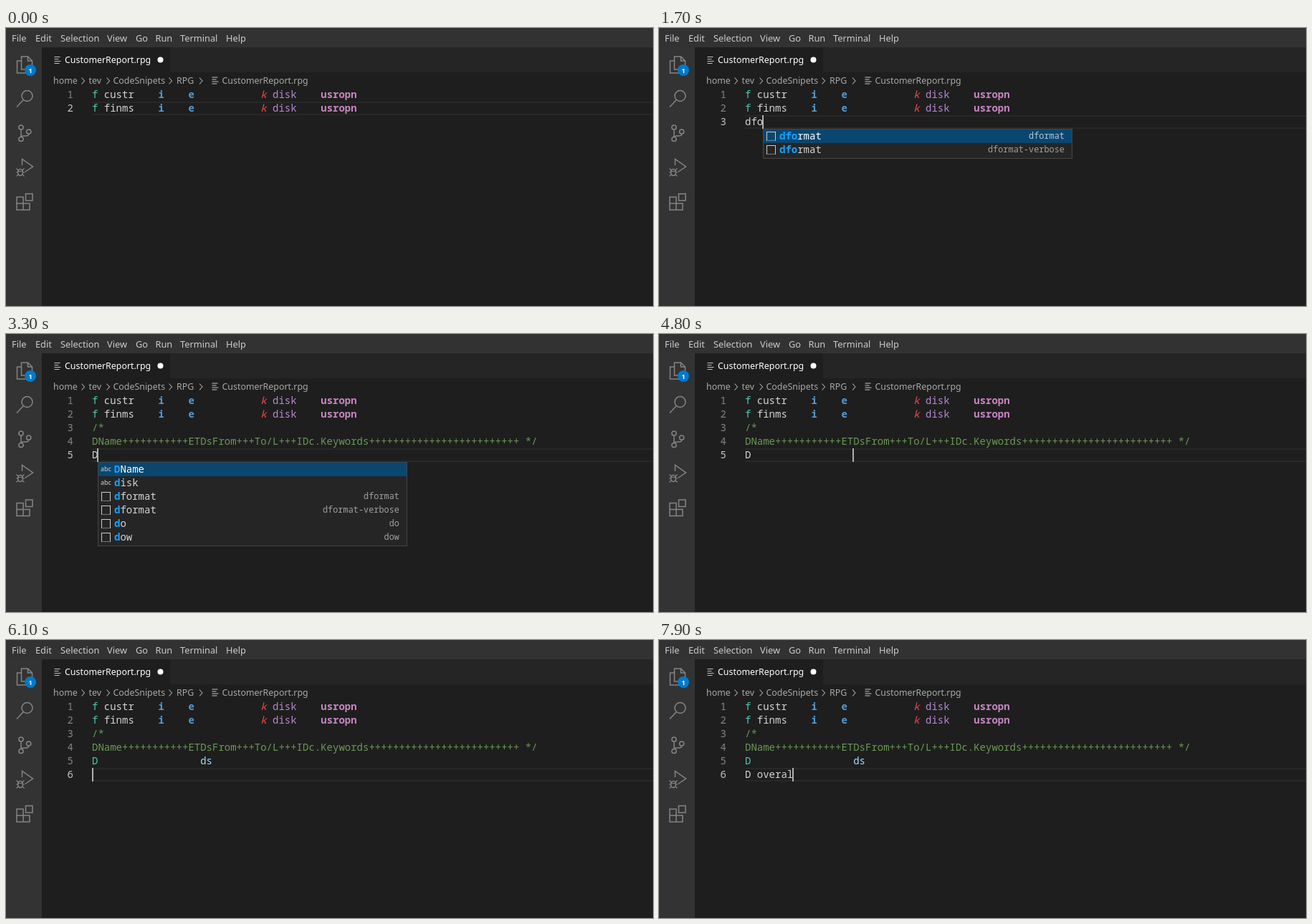
These frames come from a looping animation (903x389 px, 8000 ms). An HTML page:

```html
<!DOCTYPE html>
<html lang="en">
<head>
<meta charset="utf-8">
<title>Code editor</title>
<style>
html, body { margin: 0; width: 100%; height: 100%; overflow: hidden; background: #1e1e1e; }
#stage { position: relative; width: 903px; height: 389px; overflow: hidden; background: #1e1e1e;
  font: 12.4px/18px "Noto Sans", "Open Sans", sans-serif; color: #ccc; }
#stage div, #stage svg, .ui span { position: absolute; white-space: pre; }
.title { left: 0; top: 0; width: 903px; height: 27px; background: #323233; font-size: 12.8px; }
.title span { top: 5px; }
.side { left: 0; top: 27px; width: 50px; height: 362px; background: #333; }
.tabs { left: 50px; top: 27px; width: 853px; height: 35px; background: #252526; }
.tab { left: 0; top: 0; width: 179px; height: 35px; background: #1e1e1e; color: #fff; }
.tab span { left: 32px; top: 9px; }
.crumbs { left: 0; top: 62px; color: #a9a9a9; }
.crumbs span { top: 3px; }
#icons { left: 0; top: 0; fill: none; stroke: #858585; stroke-width: 1.5; }

#editor { left: 0; top: 84px; width: 903px; height: 305px; }
#editor, #popup { font: 14px/19px "Noto Sans Mono", "DejaVu Sans Mono", monospace; color: #d4d4d4; }
.line, .num, .label, .detail, .abc { margin-top: -1px; }
.line { left: 120px; height: 19px; }
.num { left: 60px; width: 34px; text-align: right; color: #858585; }
.num.now { color: #c6c6c6; }
#here { left: 120px; width: 783px; height: 19px; box-sizing: border-box;
  border: solid #282828; border-width: 2px 0; }
#caret { width: 2px; height: 19px; background: #aeafad; }
.spec { color: #4ec9b0; }
.flag { color: #569cd6; font-weight: 700; }
.key { color: #f44747; font-style: italic; }
.dev { color: #b888d0; }
.word { color: #c586c0; font-weight: 700; }
.note { color: #6a9955; }
.var { color: #9cdcfe; }

#popup { width: 432px; box-sizing: border-box; background: #252526; border: 1px solid #454545; }
.row { left: 0; width: 430px; height: 19px; }
.row.on { background: #094771; color: #fff; }
.row b { color: #18a3ff; }
.label { left: 22px; }
.detail { right: 10px; font-size: 11.9px; opacity: .7; }
.abc { left: 3px; font: 9px/19px "Noto Sans", sans-serif; color: #d4d4d4; }
.snip { left: 4px; top: 3px; width: 11px; height: 11px; border: 1px solid #ccc; border-bottom-style: dotted; }
</style>
</head>
<body>
<div id="stage">
  <div class="ui title">
    <span style="left:8px">File</span><span style="left:41px">Edit</span>
    <span style="left:76px">Selection</span><span style="left:141px">View</span>
    <span style="left:181px">Go</span><span style="left:208.5px">Run</span>
    <span style="left:243px">Terminal</span><span style="left:307px">Help</span>
  </div>
  <div class="side"></div>
  <div class="tabs"><div class="ui tab"><span>CustomerReport.rpg</span></div></div>
  <div class="ui crumbs">
    <span style="left:66px">home</span><span style="left:115.5px">tev</span>
    <span style="left:149.5px">CodeSnipets</span><span style="left:238px">RPG</span>
    <span style="left:301.5px">CustomerReport.rpg</span>
  </div>
  <svg id="icons" width="903" height="389">
    <!-- files -->
    <path d="M21.5 40h9l6 6v12h-15zM30.5 40v6h6M21.5 46h-6v17h14v-5"/>
    <circle cx="34" cy="59" r="8" fill="#007acc" stroke="none"/>
    <text x="34" y="62.5" text-anchor="middle" font-size="9" font-weight="600" fill="#fff" stroke="none">1</text>
    <!-- search -->
    <circle cx="29.5" cy="95" r="7.5"/>
    <path d="M24.3 100.5L15 110.5"/>
    <!-- branches -->
    <circle cx="21" cy="139" r="3.1"/><circle cx="21" cy="155.5" r="3.1"/><circle cx="31.7" cy="145" r="3.1"/>
    <path d="M21 142v10.5M31.7 148q0 3-4 3h-3q-3.7 0-3.7 2"/>
    <!-- run and debug -->
    <path d="M22.5 192v-8.5l15 10.5-11 7.5"/>
    <ellipse cx="20" cy="202" rx="3.4" ry="4.6"/>
    <path d="M16.6 200.5h6.8M14 202h2.6M23.4 202h2.6M14.5 196.5l2.6 2.5M25.5 196.5l-2.6 2.5M14.5 207.5l2.6-2.5M25.5 207.5l-2.6-2.5" stroke-width="1.2"/>
    <!-- extensions -->
    <path d="M15 236.5h9v9h9v9h-18zM15 245.5h9v9M27.5 232h9.5v9.5h-9.5z"/>
    <!-- file marks and path arrows -->
    <g stroke="#c5c5c5" stroke-width="1.1">
      <path id="mark" d="M67.5 40.5h8M67.5 43.5h6M67.5 46.5h9M67.5 49.5h7"/>
      <use href="#mark" x="220" y="28.5"/>
    </g>
    <g stroke="#a9a9a9" stroke-width="1.1">
      <path id="arrow" d="M105.5 69.5l4 4.5-4 4.5"/>
      <use href="#arrow" x="35"/><use href="#arrow" x="122"/><use href="#arrow" x="164.5"/>
    </g>
    <circle cx="215.5" cy="44.5" r="4" fill="#fff" stroke="none"/>
  </svg>
  <div id="editor"></div>
  <div id="popup"></div>
</div>
<script>
const LOOP = 8000, CHAR = 8.4, ROW = 19, LEFT = 120, TOP = 84;
const $ = id => document.getElementById(id);
const plus = n => '+'.repeat(n);

const files = ['custr', 'finms'].map(f =>
  `f ${f}    i    e           k disk    usropn`).join('\n');
const header = `${files}\n/*\nDName${plus(11)}ETDsFrom${plus(3)}To/L${plus(3)}IDc.Keywords${plus(25)} */`;
const pad = n => `${header}\nD${' '.repeat(n - 1)}`;
const struct = pad(18) + 'ds\n';

const formats = ['dformat|dformat', 'dformat|dformat-verbose'];
const snippets = [...formats, 'do|do', 'dow|dow'];
const list = (find, on, items) => ({ find, on, items });
const pick = find => list(find, 0, formats);

// time, text, caret shown, suggestions
const steps = [
  [0, files, 0],
  [200, files, 1],
  [700, files, 0],
  [800, files + '\n', 1],
  [1300, files + '\nd', 1, list('d', 1, ['disk', ...snippets])],
  [1600, files + '\ndf', 1, pick('df')],
  [1700, files + '\ndfo', 1, pick('dfo')],
  [1800, files + '\ndfor', 1, pick('dfor')],
  [2100, header, 1],
  [2600, header, 0],
  [2700, header + '\n', 1],
  [3200, header + '\n', 0],
  [3300, header + '\nD', 1, list('d', 0, ['DName', 'disk', ...snippets])],
  [3600, pad(2), 1],
  ...[3, 6, 10, 13, 17].map((n, i) => [4100 + i * 100, pad(n), 1]),
  [4800, pad(18), 1],
  [5100, pad(18) + 'd', 1, list('d', 1, ['disk', ...snippets, 'D', 'DName'])],
  [5300, pad(18) + 'ds', 1, list('ds', 0, ['disk'])],
  [5800, pad(18) + 'ds', 0],
  [6100, struct, 1],
  [6600, struct + 'D', 1, list('d', 0, ['DName', 'disk', 'ds', ...snippets])],
  [6900, struct + 'D ', 1],
  ...[7200, 7300, 7500, 7600, 7700, 7900].map((t, i) =>
    [t, struct + 'D ' + 'overal'.slice(0, i + 1), 1])
];

const tokens = { f: 'spec', i: 'flag', e: 'flag', k: 'key', disk: 'dev', usropn: 'word' };
const span = (cls, text) => `<span class="${cls}">${text}</span>`;

function paint(line) {
  if (/^f /.test(line))
    return line.replace(/\S+/g, w => tokens[w] ? span(tokens[w], w) : w);
  if (/^\/\*|\*\/$/.test(line)) return span('note', line);
  return line.replace(/^(D)( +)(ds?)$/, (_, d, gap, type) =>
    span('spec', d) + gap + (type === 'ds' ? span('var', type) : type));
}

// Emphasise the typed letters in order
function match(label, find) {
  let n = 0;
  return [...label].map(c => c.toLowerCase() === find[n] ? (n++, `<b>${c}</b>`) : c).join('');
}

function showPopup(menu, row, col) {
  const box = $('popup');
  box.style.display = menu ? 'block' : 'none';
  if (!menu) return;
  box.style.left = Math.round(LEFT + col * CHAR) + 'px';
  box.style.top = TOP + row * ROW + 'px';
  box.style.height = menu.items.length * ROW + 4 + 'px';
  box.innerHTML = menu.items.map((item, i) => {
    const [label, detail] = item.split('|');
    const icon = detail ? '<div class="snip"></div>' : '<div class="abc">abc</div>';
    return `<div class="row${i === menu.on ? ' on' : ''}" style="top:${i * ROW}px">${icon}` +
      `<div class="label">${match(label, menu.find)}</div><div class="detail">${detail || ''}</div></div>`;
  }).join('');
}

function show([, text, caret, menu]) {
  const lines = text.split('\n'), last = lines.length - 1, col = lines[last].length;
  const x = col ? Math.round(LEFT + col * CHAR - 1) : LEFT;
  $('editor').innerHTML = `<div id="here" style="top:${last * ROW}px"></div>` +
    lines.map((line, i) =>
      `<div class="num${i === last ? ' now' : ''}" style="top:${i * ROW}px">${i + 1}</div>` +
      `<div class="line" style="top:${i * ROW}px">${paint(line)}</div>`).join('') +
    (caret ? `<div id="caret" style="left:${x}px;top:${last * ROW}px"></div>` : '');
  showPopup(menu, last + 1, col);
}

let shown;
function tick() {
  const t = performance.now() % LOOP;
  const step = steps.filter(s => s[0] <= t).pop();
  if (step !== shown) show(shown = step);
  requestAnimationFrame(tick);
}
tick();
</script>
</body>
</html>
```
